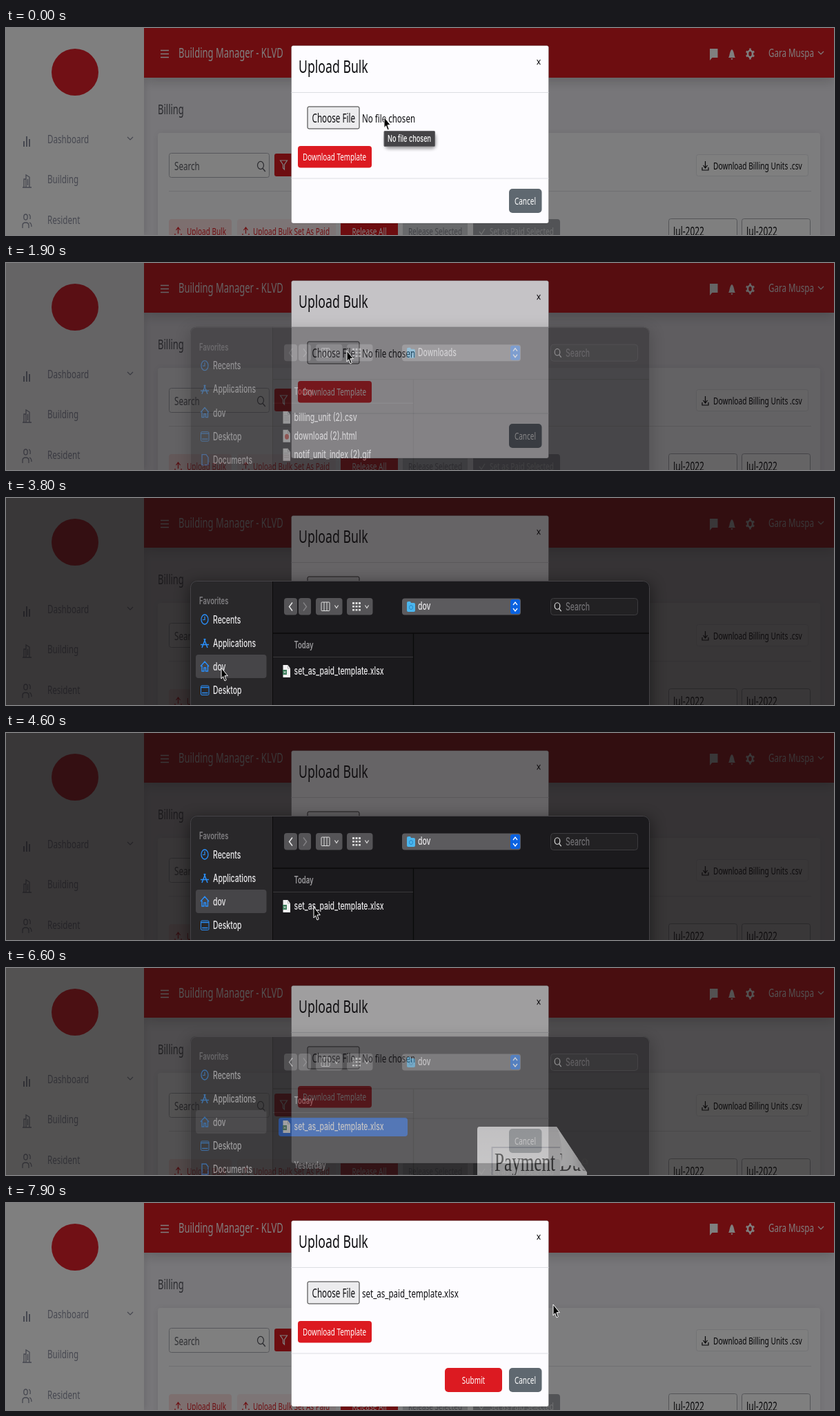
Animation of 1200x300 px, one loop 8 s. Source, as an HTML page:

```html
<!DOCTYPE html>
<html lang="en">
<head>
<meta charset="utf-8">
<title>Upload Bulk</title>
<style>
html, body { margin: 0; width: 100%; height: 100%; overflow: hidden; background: #777; }
svg { display: block; width: 1200px; height: 300px; font-family: "Noto Sans", sans-serif; }
.ui { font-family: Inter, sans-serif; font-weight: 500; }
.serif { font-family: "Liberation Serif", serif; }
</style>
</head>
<body>
<svg id="stage" viewBox="0 0 1200 300"></svg>
<script>
const SQUEEZE = 0.68; // the whole screen is shown narrower than it is tall
const LOOP = 8000;
const RED = '#dc1a21', BLUE = '#2a8ffb', MUTED = '#8e91a2', INK = '#0e0e11';

const text = (x, y, size, str, fill = INK, attrs = '') =>
  `<text transform="translate(${x} ${y}) scale(${SQUEEZE} 1)" font-size="${size}" fill="${fill}" ${attrs}>${str}</text>`;
const mid = (x, y, size, str, fill) => text(x, y, size, str, fill, 'text-anchor="middle"');
const box = (x, y, w, h, fill, r = 0, stroke = 'none') =>
  `<rect x="${x}" y="${y}" width="${w}" height="${h}" rx="${r}" fill="${fill}" stroke="${stroke}"/>`;
const shadow = (x, y, w, h, blur, alpha) =>
  `<rect x="${x}" y="${y}" width="${w}" height="${h}" rx="6" fill="#000" opacity="${alpha}" style="filter:blur(${blur}px)"/>`;
const line = (d, color, width = 1, fill = 'none') =>
  `<path d="${d}" stroke="${color}" stroke-width="${width}" fill="${fill}"/>`;
const shape = (d, fill) => `<path d="${d}" fill="${fill}"/>`;
const oval = (x, y, rx, ry, fill, stroke = 'none', width = 1) =>
  `<ellipse cx="${x}" cy="${y}" rx="${rx}" ry="${ry}" fill="${fill}" stroke="${stroke}" stroke-width="${width}"/>`;
const group = (id, ...parts) => `<g id="${id}">${parts.join('')}</g>`;
const chevron = (x, y, color, w = 4, h = 4) => line(`M${x - w} ${y - h / 2}l${w} ${h}l${w} ${-h}`, color, 1.2);
const lens = (x, y, color, r) =>
  oval(x, y, r, r * 1.25, 'none', color, 1.2) + line(`M${x + r * .7} ${y + r}l${r * .8} ${r}`, color, 1.3);
const tray = (x, y, color, up) =>
  line(`M${x} ${y + 8}v4h9v-4M${x + 4.5} ${y - 1}v9M${x + 1.5} ${up ? y + 3 : y + 5}l3 ${up ? -4 : 4}l3 ${up ? 4 : -4}`, color, 1.2);

function page() {
  return [
    box(0, 0, 1200, 300, '#efedf3'),
    shadow(200, 40, 1000, 38, 8, .16),
    shadow(150, 0, 52, 300, 5, .1),
    box(200, 0, 1000, 72, RED),
    box(0, 0, 200, 300, '#fff'),
    oval(100, 64, 34, 34, '#e3202b'),
    // top bar
    line('M224 32.5h12M224 37.5h12M224 42.5h12', '#fff', 1.3),
    text(250, 43, 19.1, 'Building Manager - KLVD', '#fff'),
    shape('M1020 30h11.500v13h-8l-3.500 4z', '#fff'),
    shape('M1047 43c2-2 1.500-10 5-12c3.500 2 3 10 5 12zM1050.500 44h3l-1.500 2.500z', '#fff'),
    oval(1078.500, 37.500, 3.500, 4.700, 'none', '#fff', 2.600),
    line('M1078.500 29.500v3M1078.500 42.500v3M1072.700 34l2 1M1082.300 40l2 1M1072.700 41l2-1M1082.300 35l2-1', '#fff', 2.600),
    text(1105, 42, 17.1, 'Gara Muspa', '#fff'),
    chevron(1181, 36, '#fff'),
    // side menu
    line('M26 172v-8M30 172v-15M34 172v-11', MUTED, 2),
    text(60, 167, 17.1, 'Dashboard', MUTED),
    chevron(180, 160, MUTED),
    line('M24 231h13M26 231v-12h3M29 231v-18l5 3v15M31.500 219v9', MUTED, 1.3),
    text(60, 225, 17.1, 'Building', MUTED),
    oval(28.500, 274, 2.700, 4, 'none', MUTED, 1.3),
    line('M24 290v-4q0-4 4.500-4t4.500 4v4M33 270q3 1 2 7M34 282q3 1 3 6', MUTED, 1.3),
    text(60, 284, 17.1, 'Resident', MUTED),
    // card
    text(220, 125, 19.1, 'Billing', '#55565e'),
    shadow(220, 153, 960, 170, 5, .08),
    box(220, 152, 960, 160, '#fcfbfe', 4),
    box(236.5, 181.5, 145, 35, '#fff', 3, '#b0b2b9'),
    text(244, 206, 17.1, 'Search', '#5d5f66'),
    lens(369, 199, '#55575f', 4.500),
    box(389, 182, 40, 33, RED, 3),
    line('M397.500 192h10l-4 6v7l-2-2v-5z', '#fff', 1.2),
    box(1000.5, 183.5, 162, 31, '#fff', 3, '#e6e7ec'),
    tray(1009, 194, INK, false),
    text(1025, 205, 15, 'Download Billing Units .csv', INK, 'font-weight="500"'),
    line('M236 236.500H1167', '#dfdfe4'),
    box(236, 277, 91, 36, '#fbdfe0', 4),
    tray(245, 290, RED, true),
    text(262, 300, 14.700, 'Upload Bulk', RED),
    box(335, 277, 143, 36, '#fbeced', 4),
    tray(343, 290, RED, true),
    text(358, 300, 14.700, 'Upload Bulk Set As Paid', RED),
    box(485, 277, 83, 36, RED, 4),
    mid(526.5, 300, 14.700, 'Release All', '#fff'),
    box(575, 277, 94, 36, '#d2d3d7', 4),
    mid(622, 300, 14.700, 'Release Selected', '#85878f'),
    box(677, 277, 126, 36, '#a6a8ad', 4),
    line('M686 295l3 4l5-8', '#dfe0e3', 1.3),
    text(701, 300, 14.700, 'Set as Paid Selected', '#dfe0e3'),
    ...[960, 1066].map(x => box(x + .5, 276.5, 99, 40, '#fff', 3, '#a9abb2') + text(x + 7, 301, 17.600, 'Jul-2022')),
    box(0, 0, 1200, 300, 'rgba(0,0,0,.5)')
  ].join('');
}

function modal() {
  return [
    `<rect id="panel" x="413.500" y="25.500" width="373" height="257.500" rx="3" fill="#fdfcff" stroke="rgba(0,0,0,.2)"/>`,
    text(424, 65, 26, 'Upload Bulk', INK),
    mid(772, 56, 18, '×', INK),
    line('M413.500 93.500h373M413.500 218h373', '#dcdde2'),
    `<rect id="choose" x="437" y="114" width="75" height="32" rx="2" stroke="#333"/>`,
    text(443.5, 137, 17.200, 'Choose File'),
    group('empty', text(516, 137, 17, 'No file chosen')),
    group('filled', text(516, 137, 17, 'set_as_paid_template.xlsx')),
    box(423, 171, 107, 31.5, RED, 4),
    text(430, 192, 14.500, 'Download Template', '#fff'),
    group('cancel', box(729, 233, 47.5, 35, '#5f6870', 5), mid(752.5, 256, 14.700, 'Cancel', '#fff')),
    group('submit', box(636, 239, 83, 35, RED, 5), mid(677.5, 262, 14.700, 'Submit', '#fff')),
    group('tip',
      shadow(549, 152, 74, 23, 2.5, .4),
      box(548, 149.5, 73.5, 22, '#454447', 1, '#67666a'),
      text(553, 165, 13.500, 'No file chosen', '#fff', 'class="ui"'))
  ].join('');
}

const ui = (x, y, str, size = 15.4, fill = '#e9e8ea') => text(x, y, size, str, fill, 'class="ui"');
const head = (x, y, str, fill) => text(x, y, 14, str, fill, 'class="ui" style="font-weight:600"');

function file(y, name, mark) {
  return shape(`M401.500 ${y - 9}h7l3.500 5v13h-10.500z`, '#f1f1f2')
    + line(`M408.500 ${y - 9}v5h3.500`, '#aaa', .8) + mark + ui(417.5, y + 5, name);
}
const sheetMark = y => box(401, y - 2, 6, 7, '#3a7a58') + line(`M402.500 ${y}l3 3m0-3l-3 3`, '#fff', .8);
const rows = y => line(`M403 ${y - 2}h6M403 ${y + 1}h7M403 ${y + 4}h7`, '#bbb', .8);
const folder = shape('M581 152q0-2 2-2h3l1 2h4q2 0 2 2v9q0 2-2 2h-8q-2 0-2-2z', '#4bb6ee')
  + oval(587, 158.500, 2.500, 3, 'none', '#2583c4');

function preview() {
  return [
    `<defs><linearGradient id="paper" x2="0" y2="1"><stop stop-color="#e4e3e5"/><stop offset=".6" stop-color="#fff"/></linearGradient>
     <linearGradient id="curl"><stop stop-color="#fff"/><stop offset=".5" stop-color="#f0f0f1"/><stop offset="1" stop-color="#bcbbbe"/></linearGradient></defs>`,
    shape('M683 255q0-4 3-4H798L842 317V460H683z', 'url(#paper)'),
    line('M704.500 460V281H803', '#b5b6c0', 2),
    text(708, 315, 37, 'Payment Due', '#222', 'class="serif"'),
    shape('M798 251C806 270 807 290 804 309C815 304 830 308 842 317z', 'url(#curl)')
  ].join('');
}

function dialog() {
  const btn = (x, w) => box(x, 145, w, 24.5, '#555457', 4);
  const grid = [0, 5, 10].map(dy =>
    [0, 4.5, 9].map(dx => box(502 + dx, 151 + dy, 3, dy ? 2.500 : 3, '#ddd')).join('')).join('');
  return [
    shadow(265, 124, 670, 400, 11, .45),
    box(267, 120, 666, 400, '#1b1a1d', 9),
    shape('M386 120H276q-9 0-9 9V520H386z', '#29282a'),
    line('M386.500 120V520', '#0a0a0a'),
    line('M387 196H933M590.500 196V520', '#0a0a0a', 1.3),
    box(267.5, 120.5, 665, 400, 'none', 9, '#454347'),
    head(280, 154, 'Favorites', '#7f7e81'),
    group('here', box(275, 227, 102.5, 34, '#464548', 4)),
    oval(288, 176, 5, 7, 'none', BLUE, 1.3) + line('M288 171.500v5h-3', BLUE, 1.2),
    line('M284 217l5-13M287 204l5 13M282 212.500h12', BLUE, 1.5),
    line('M282 244l6-7l6 7M284 243v8h3v-5h2.500v5h3v-8', BLUE, 1.4),
    box(282.5, 272, 11.5, 13.5, 'none', 1.500, BLUE) + line('M282.500 274.500h11.500M284 282.500h8.500', BLUE, 1.4),
    line('M284 305h6l3 4v11h-9z', BLUE, 1.3),
    ...['Recents', 'Applications', 'dov', 'Desktop', 'Documents'].map((s, i) => ui(300, 181.5 + i * 34.2, s)),
    // toolbar
    btn(403, 19), btn(424, 18), btn(449, 38.5), btn(494, 37.5),
    `<path id="back" d="M415 151.500l-4.500 6l4.500 6" fill="none" stroke-width="1.400"/>`,
    line('M431 151.500l4.500 6l-4.500 6', '#838285', 1.4),
    box(457, 151, 12, 12.5, 'none', 1, '#ddd') + line('M461 151v12.500M465 151v12.500', '#ddd'),
    chevron(479, 157.500, '#ddd', 2.600), grid, chevron(523, 157.500, '#ddd', 2.600),
    box(574, 145.5, 172, 24, '#5c5b5e', 4), folder,
    box(731, 147, 14, 21, '#0a62e0', 3),
    line('M735 155l3-4l3 4M735 160l3 4l3-4', '#fff', 1.3),
    box(789.5, 145.5, 126, 24, '#222123', 4, '#3d3c3f'),
    lens(799, 156.500, '#ddd', 3.800),
    ui(811, 163, 'Search', 15.4, '#727174'),
    head(417.5, 218, 'Today', '#9a999c'),
    line('M387 230.500H590', '#39383a'),
    group('downloads',
      ui(597, 162, 'Downloads'),
      file(251, 'billing_unit (2).csv', rows(251)),
      file(278, 'download (2).html', oval(407, 279, 3, 4, '#d8433a')),
      file(305, 'notif_unit_index (2).gif', rows(305))),
    group('home',
      ui(597, 162, 'dov'),
      group('picked', box(395, 238, 187, 27, '#0850cf', 4), preview()),
      file(251, 'set_as_paid_template.xlsx', sheetMark(251)),
      head(417.5, 312, 'Yesterday', '#9a999c'),
      line('M387 320.500H590', '#39383a'),
      file(333, 'payment_template.xlsx', sheetMark(333)))
  ].join('');
}

const stage = document.getElementById('stage');
stage.innerHTML = group('page', page()) + group('modal', modal())
  + '<rect id="dim" width="1200" height="300" fill="#120f11"/>' + group('dialog', dialog())
  + group('pointer', line('M0 0V16l2.700-3.300L5 19l2.200-1.200L5 11.700h4.300z', '#fff', 1, '#000'));

const el = id => document.getElementById(id);
const show = (id, on) => el(id).setAttribute('display', on ? 'inline' : 'none');
const clamp = v => Math.min(1, Math.max(0, v));
const ease = p => p * p * (3 - 2 * p);

// time, x, y of the pointer
const PATH = [
  [0, 548, 129], [1000, 548, 129], [1400, 494, 127], [2200, 494, 127], [2900, 379, 279],
  [3300, 312, 246], [3900, 312, 246], [4600, 446, 252], [5100, 446, 252],
  [5600, 800, 380], [7000, 880, 400], [7600, 793, 147], [8000, 793, 147]
];

function pointerAt(t) {
  const i = Math.max(1, PATH.findIndex(k => k[0] > t));
  const [a, b] = [PATH[i - 1], PATH[i]];
  const p = ease((t - a[0]) / (b[0] - a[0]));
  return [a[1] + (b[1] - a[1]) * p, a[2] + (b[2] - a[2]) * p];
}

function draw(t) {
  const opening = clamp((t - 1750) / 400), closing = clamp((t - 6450) / 400);
  const home = t >= 3600, loaded = t >= 6900;
  el('dim').setAttribute('opacity', 0.64 * opening * (1 - closing));
  el('dialog').setAttribute('opacity', opening * (1 - closing) ** 1.5);
  el('dialog').setAttribute('transform', `translate(0 ${-40 * (1 - ease(opening)) - 56 * closing})`);
  el('pointer').setAttribute('transform', `translate(${pointerAt(t)})`);
  el('choose').setAttribute('fill', t >= 1300 && t < 2200 ? '#dddce0' : '#ececee');
  el('back').setAttribute('stroke', home ? '#eee' : '#838285');
  el('panel').setAttribute('height', loaded ? 269.5 : 257.5);
  el('cancel').setAttribute('transform', `translate(0 ${loaded ? 6 : 0})`);
  show('tip', t < 1100);
  show('empty', !loaded);
  show('filled', loaded);
  show('submit', loaded);
  show('here', home);
  show('home', home);
  show('downloads', !home);
  show('picked', t >= 5000);
}

function tick() {
  draw(Math.floor(performance.now() % LOOP / 100) * 100);
  requestAnimationFrame(tick);
}
tick();
</script>
</body>
</html>
```
